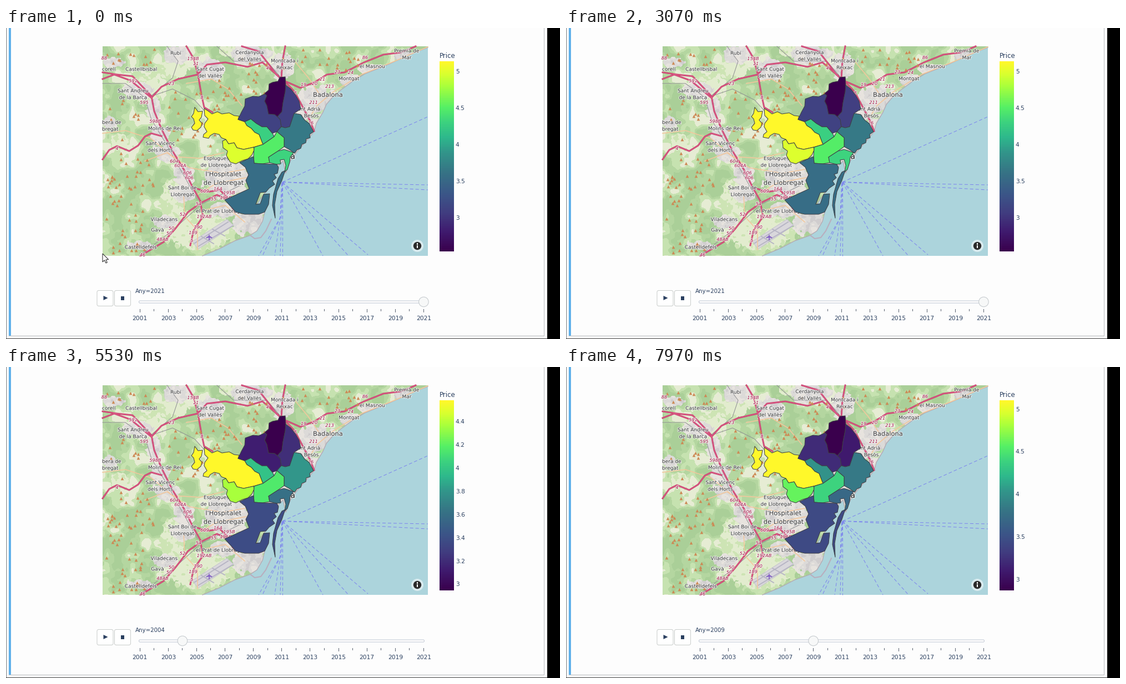
A matplotlib script for the animation above (8000 ms loop, 998x561 px).

```python
import numpy as np
import matplotlib.pyplot as plt
from matplotlib import patheffects
from matplotlib.animation import FuncAnimation
from matplotlib.colors import LinearSegmentedColormap
from matplotlib.patches import Circle, FancyBboxPatch, Polygon, Rectangle

W, H, DPI = 998, 561, 64
PT = 72 / DPI
FRAMES, STEP = 200, 40
X0, X1, Y0, Y1 = 174, 760, 33, 411
INK = "#2a3f5f"
rng = np.random.default_rng(7)

plt.rcParams["font.family"] = "DejaVu Sans"
fig = plt.figure(figsize=(W / DPI, H / DPI), dpi=DPI, facecolor="#fdfdfd")


def stage():
    ax = fig.add_axes([0, 0, 1, 1])
    ax.set(xlim=(0, W), ylim=(H, 0))
    ax.axis("off")
    return ax


ax = stage()
cmap = LinearSegmentedColormap.from_list("price", [
    (0, "#3a004d"), (.1, "#3f1a6e"), (.2, "#413d80"), (.3, "#3b5688"),
    (.42, "#367585"), (.52, "#32958a"), (.6, "#2eb88c"), (.68, "#3cd27f"),
    (.76, "#56f065"), (.87, "#a8ff3c"), (.94, "#dcff2e"), (1, "#fff82a")])


def box(x, y, w, h, color, z=1):
    ax.add_patch(Rectangle((x, y), w, h, fc=color, ec="none", zorder=z))


def text(x, y, s, size, color=INK, ha="left", **kw):
    return ax.text(x, y + .36 * size, s, fontsize=size * PT, color=color,
                   ha=ha, va="baseline", **kw)


def path(pts, color, w, z=3, **kw):
    x, y = zip(*pts)
    return ax.plot(x, y, color=color, lw=w * PT, zorder=z, clip_path=clip,
                   solid_joinstyle="round", **kw)


# ---- terrain ----
def noise(cell):
    w, h = X1 - X0, Y1 - Y0
    g = rng.random((h // cell + 2, w // cell + 2))
    y, x = np.arange(h) / cell, np.arange(w) / cell
    i, j = y.astype(int), x.astype(int)
    v, u = (y - i)[:, None], (x - j)[None, :]
    u, v = u * u * (3 - 2 * u), v * v * (3 - 2 * v)
    i, j = i[:, None], j[None, :]
    return ((g[i, j] * (1 - u) + g[i, j + 1] * u) * (1 - v)
            + (g[i + 1, j] * (1 - u) + g[i + 1, j + 1] * u) * v)


def blobs(spots):
    yy, xx = np.mgrid[Y0:Y1, X0:X1]
    return np.max([np.exp(-((xx - x) / a) ** 2 - ((yy - y) / b) ** 2)
                   for x, y, a, b in spots], axis=0)


towns = [(306, 48, 32, 18), (368, 75, 28, 24), (440, 48, 45, 20),
         (497, 70, 24, 28), (240, 112, 32, 16), (266, 145, 14, 24),
         (278, 192, 20, 22), (288, 225, 26, 18), (320, 265, 20, 24),
         (395, 268, 50, 42), (322, 298, 26, 18), (392, 328, 34, 16),
         (285, 350, 26, 14), (245, 392, 28, 10), (560, 130, 38, 30),
         (620, 96, 26, 14), (660, 74, 26, 10), (720, 52, 32, 12),
         (195, 62, 24, 10), (186, 170, 14, 14), (440, 350, 36, 26),
         (490, 190, 80, 80)]
fields = [(345, 365, 75, 42), (300, 310, 26, 45), (255, 110, 30, 30),
          (205, 205, 20, 18), (300, 75, 40, 20), (400, 40, 24, 16)]

fine = .6 * noise(9) + .4 * noise(4)
coarse = .65 * noise(26) + .35 * noise(9)
land = np.full(coarse.shape + (3,), (198, 226, 176), float)
land[coarse > .47] = (180, 214, 160)
land[coarse > .62] = (170, 207, 152)
land[coarse < .33] = (230, 236, 212)
farm = blobs(fields) + .5 * (fine - .5) > .5
land[farm] = (226, 236, 206)
land[farm & (fine > .58)] = (205, 228, 180)
urban = blobs(towns) + .55 * (fine - .5) > .48
land[urban] = (220, 218, 216)
land[urban & (fine > .6)] = (231, 227, 222)
land[urban & (fine < .34)] = (208, 205, 206)

ax.imshow(land / 255, extent=(X0, X1, Y1, Y0), aspect="auto", zorder=1)
ax.set(xlim=(0, W), ylim=(H, 0))
clip = Rectangle((X0, Y0), X1 - X0, Y1 - Y0, transform=ax.transData)

coast = [(354, 411), (385, 398), (412, 384), (440, 374), (452, 366),
         (462, 349), (466, 333), (450, 321), (470, 292), (482, 268),
         (492, 247), (499, 240), (504, 262), (512, 240), (522, 226),
         (540, 205), (555, 187), (559, 172), (571, 152), (577, 138),
         (588, 125), (603, 112), (622, 98), (646, 83), (690, 65),
         (730, 47), (760, 35)]
ax.add_patch(Polygon(coast + [(760, 411)], fc="#acd4dc", ec="none", zorder=2))
path(coast, "#b3a9b2", 1.3)
path([(440, 374), (448, 380), (459, 378), (468, 366), (478, 345)],
     "#b9adbd", 2)
ax.add_patch(Polygon([(336, 385), (398, 345), (410, 356), (346, 399)],
                     fc="#d9d7dc", ec="#c4c2cc", lw=1, zorder=2))
for a, b in [((340, 388), (400, 350)), ((346, 394), (408, 357)),
             ((352, 376), (374, 389)), ((372, 363), (394, 375))]:
    path([a, b], "#b6b4c4", 1.8)

# ---- roads and rails ----
for pts in [[(174, 100), (215, 100), (250, 125), (262, 165), (292, 215), (318, 262), (345, 310)],
            [(262, 123), (300, 110), (340, 130), (358, 150)],
            [(290, 33), (310, 60), (300, 90), (262, 122)],
            [(240, 411), (300, 365), (352, 318), (420, 285)],
            [(380, 33), (410, 60), (470, 60), (500, 95)]]:
    path(pts, "#8f8f93", 1)
for pts in [[(174, 190), (215, 185), (262, 200), (300, 232), (350, 235), (392, 225)],
            [(250, 240), (290, 225), (330, 252), (390, 262), (430, 255)],
            [(345, 300), (380, 280), (432, 270)],
            [(350, 330), (395, 320), (430, 350)],
            [(545, 165), (560, 140), (590, 115), (640, 84), (700, 60), (760, 34)],
            [(325, 100), (370, 92), (400, 110), (425, 140)],
            [(520, 60), (545, 90), (565, 120)],
            [(320, 300), (322, 340), (345, 365), (345, 400)]]:
    path(pts, "#f3c79c", 1.6)

highways = [
    [(174, 80), (200, 84), (228, 87), (245, 105), (262, 123), (267, 150),
     (280, 182), (300, 222), (322, 258), (336, 287), (350, 312)],
    [(174, 92), (195, 84), (225, 95), (262, 126), (280, 106), (310, 92),
     (345, 84), (362, 66), (395, 62), (435, 70), (462, 62), (490, 86)],
    [(325, 33), (338, 55), (346, 85), (352, 120), (357, 143), (372, 152)],
    [(425, 33), (455, 42), (473, 65), (487, 84), (496, 92)],
    [(503, 33), (498, 60), (496, 90), (520, 115), (548, 168), (555, 186)],
    [(503, 96), (530, 108), (556, 98), (578, 84), (610, 80), (645, 62),
     (680, 48), (712, 44), (738, 33)],
    [(174, 237), (186, 220), (200, 213), (222, 222), (238, 212), (250, 196),
     (262, 190), (280, 195)],
    [(242, 411), (284, 386), (305, 362), (328, 332), (350, 316), (380, 301),
     (402, 311), (420, 300)],
    [(336, 287), (362, 296), (385, 292), (398, 305), (412, 332)],
    [(350, 314), (355, 340), (338, 365), (332, 392)],
]
for road in highways:
    path(road, "#c32f62", 2.8)
    path(road, "#e0648e", 1.2, z=3.1)

for x0, x1, y0, y1, n in [(178, 250, 235, 406, 46), (178, 290, 38, 66, 12),
                          (178, 250, 130, 165, 8), (290, 350, 110, 205, 12),
                          (362, 472, 92, 146, 24), (530, 640, 38, 76, 18),
                          (395, 520, 36, 90, 10), (300, 420, 150, 215, 10),
                          (180, 270, 195, 300, 14)]:
    ax.scatter(rng.uniform(x0, x1, n), rng.uniform(y0, y1, n), s=40,
               marker="^", color="#cc8a55", lw=0, zorder=3.2)

# ---- ferry lines ----
for end in [(760, 160), (760, 283), (760, 292), (652, 409), (617, 411),
            (571, 411), (498, 411), (494, 411)]:
    path([(498, 278), end], "#7c84ee", 1, dashes=(6, 4))
for end in [(455, 411), (462, 411), (484, 411)]:
    path([(497, 280), (494, 342), end], "#7c84ee", 1, dashes=(6, 4))

# ---- map labels ----
halo = [patheffects.withStroke(linewidth=2.2, foreground=(1, 1, 1, .75))]


def label(x, y, s, size=9, color="#3a3a3a", ha="center", **kw):
    lines = s.split("|")
    for k, line in enumerate(lines):
        dy = (k - (len(lines) - 1) / 2) * 1.35 * size
        text(x, y + dy, line, size, color, ha, zorder=5, path_effects=halo,
             clip_path=clip, **kw)


for x, y, s in [
        (306, 45, "Rubí"), (439, 50, "Cerdanyola|del Vallès"),
        (502, 65, "Montcada i|Reixac"), (722, 47, "Premià de|Mar"),
        (660, 69, "el Masnou"), (618, 91, "Montgat"),
        (244, 74, "Castellbisbal"), (368, 80, "Sant Cugat|del Vallès"),
        (229, 119, "Sant Andreu|de la Barca"), (543, 152, "Sant Adrià|de Besòs"),
        (286, 181, "Molins de Rei"), (278, 214, "Sant Vicenç|dels Horts"),
        (379, 241, "Esplugues|de Llobregat"), (318, 294, "Sant Boi de|Llobregat"),
        (285, 345, "Viladecans"), (273, 364, "Gavà"), (243, 395, "Castelldefels")]:
    label(x, y, s)
label(173, 74, "corell", ha="left")
label(173, 176, "bera de|bregat", ha="left")
label(342, 330, "el Prat de Llobregat", ha="left")
label(580, 120, "Badalona", 11.5)
label(392, 271, "l'Hospitalet|de Llobregat", 11.5)
label(521, 231, "a", 14, "#222222", "right")

signs = """88 177 54;591 229 95;595 249 134;598B 269 168;23 298 100;154B 337 55
11 342 64;8 353 125;4 471 72;604 303 240;604A 314 248;606 327 261;606 330 270
609 358 294;16A 382 290;195B 402 297;196B 396 306;55 374 308;54 347 317
52 318 336;192AB 357 340;190 346 359;189 337 369;5 335 383;50 298 361
50 294 370;48AB 282 381;46 246 409;4 200 217;19 536 102;20 556 100;21 570 92
213 583 105;23 597 79;24 621 80;86 647 53;211 554 134;8 521 117;26 549 171"""
for sign in signs.replace("\n", ";").split(";"):
    s, x, y = sign.split()
    label(int(x), int(y), s, 8.2, "#a01c48", style="italic")

plane = [(0, -5.5), (1, -2), (5.5, 1), (5.5, 2.4), (1, 1.2), (.8, 4), (2.2, 5.5),
         (-2.2, 5.5), (-.8, 4), (-1, 1.2), (-5.5, 2.4), (-5.5, 1), (-1, -2)]
ax.add_patch(Polygon(np.array(plane) + (366, 377), fc="#8461c4", zorder=5))

ax.add_patch(Circle((741, 393), 11, fc=(1, 1, 1, .55), ec="none", zorder=5))
ax.add_patch(Circle((741, 393), 7.2, fc="#2b2b2b", ec="none", zorder=6))
box(740, 391.6, 2.2, 5.4, "white", 7)
box(740, 388.4, 2.2, 2.1, "white", 7)

# ---- page frame, colour bar and controls ----
box(0, 0, 1, H, "#77797c")
box(5, 0, 4, 555, "#5fb0ea")
box(5, 555, 965, 1, "#b9bcbf")
box(969, 0, 1, 556, "#b9bcbf")
box(0, 560, 975, 1, "#3c3c3c")
box(975, 0, 23, H, "black")

ax.imshow(np.linspace(1, 0, 343)[:, None], cmap=cmap, aspect="auto",
          extent=(781, 807, 403, 60), zorder=1)
ax.set(xlim=(0, W), ylim=(H, 0))
text(781, 49.5, "Price", 11.8)


def rounded(x, y, w, h, r, fc, ec):
    ax.add_patch(FancyBboxPatch((x + r, y + r), w - 2 * r, h - 2 * r, fc=fc, ec=ec,
                                lw=PT, boxstyle=f"round,pad={r}", zorder=2))


for x in (164, 195.5):
    rounded(x, 473.5, 29, 28, 3, "white", "#c9cdcb")
ax.add_patch(Polygon([(175.5, 483), (183.5, 487), (175.5, 491)], fc=INK, zorder=3))
box(207, 484, 6.5, 6.5, INK, 3)
rounded(239.5, 492, 514, 4.2, 2, "#fcfcfc", "#c3cad6")


def year_x(year):
    return 241.2 + 25.56 * (year - 2001)


for year in range(2001, 2022):
    major = year % 2
    box(year_x(year) - .5, 507, 1, 6 if major else 3.5, "#5a6270")
    if major:
        text(year_x(year), 523.5, str(year), 10.6, ha="center")

# flatten everything that stands still into one picture
fig.canvas.draw()
still = np.asarray(fig.canvas.buffer_rgba()).copy()
ax.remove()
fig.figimage(still, zorder=-1)
ax = stage()

# ---- districts ----
ZONES = "sarria corts eixample gracia marti ciutat sants andreu horta nou".split()
zones = {name: [] for name in ZONES}


def zone(name, *pts):
    zones[name].append(ax.add_patch(Polygon(
        pts, fc="w", ec="#3d3f45", lw=PT, joinstyle="round", zorder=2)))


zone("sarria", (340, 143), (346, 151), (354, 150), (352, 161), (348, 166), (353, 172),
     (351, 179), (344, 185), (337, 184), (334, 179), (340, 172), (338, 164), (334, 160),
     (338, 154))
zone("sarria", (357, 145), (366, 151), (371, 155), (381, 151), (389, 155), (402, 153),
     (411, 158), (420, 159), (418, 165), (430, 169), (434, 176), (442, 181), (448, 188),
     (456, 192), (463, 210), (446, 215), (428, 219), (416, 216), (411, 207), (401, 209),
     (396, 201), (388, 198), (384, 192), (375, 190), (368, 194), (365, 199), (355, 197),
     (356, 192), (362, 187), (357, 178), (358, 172), (364, 164), (358, 158))
zone("corts", (396, 201), (401, 209), (411, 207), (416, 216), (428, 219), (446, 215),
     (447, 220), (443, 229), (436, 236), (426, 239), (414, 245), (404, 242), (397, 230),
     (399, 222), (391, 216), (390, 204))
zone("gracia", (430, 169), (441, 164), (451, 172), (461, 178), (470, 178), (480, 190),
     (483, 196), (463, 210), (456, 192), (448, 188), (442, 181), (434, 176))
zone("horta", (431, 128), (445, 123), (455, 124), (466, 119), (470, 122), (466, 132),
     (470, 140), (473, 155), (484, 156), (489, 160), (494, 165), (496, 178), (488, 187),
     (480, 190), (470, 178), (461, 178), (451, 172), (441, 164), (430, 169), (418, 165),
     (424, 152), (430, 141))
zone("nou", (474, 101), (480, 98), (490, 96), (493, 89), (503, 88), (504, 103), (503, 115),
     (499, 135), (497, 151), (489, 160), (484, 156), (473, 155), (470, 140), (466, 132),
     (470, 122), (466, 118), (473, 112))
zone("andreu", (504, 103), (513, 110), (521, 120), (528, 132), (531, 146), (519, 154),
     (515, 167), (511, 178), (503, 180), (496, 178), (494, 165), (489, 160), (497, 151),
     (499, 135), (503, 115))
zone("marti", (519, 154), (531, 156), (538, 166), (546, 172), (554, 187), (547, 192),
     (548, 198), (541, 200), (540, 207), (533, 210), (531, 217), (524, 220), (520, 226),
     (510, 219), (501, 214), (501, 198), (488, 187), (496, 178), (503, 180), (511, 178))
zone("eixample", (488, 187), (501, 198), (501, 214), (490, 222), (473, 233), (475, 243),
     (462, 245), (447, 244), (446, 232), (447, 215), (463, 210), (483, 196))
zone("ciutat", (473, 233), (490, 222), (501, 219), (510, 222), (518, 225), (512, 233),
     (511, 242), (507, 255), (502, 260), (504, 248), (501, 237), (494, 238), (495, 245),
     (488, 246), (475, 243))
zone("sants", (446, 232), (447, 244), (462, 245), (488, 246), (491, 252), (489, 262),
     (483, 264), (487, 270), (480, 276), (484, 282), (474, 289), (468, 296), (458, 297),
     (450, 318), (458, 317), (464, 300), (475, 299), (473, 318), (466, 332), (455, 336),
     (430, 336), (414, 332), (394, 310), (412, 302), (438, 290), (432, 275), (437, 265),
     (431, 251), (421, 243), (436, 236))
zone("sants", (503, 257), (497, 275), (488, 295), (484, 318), (485, 343), (480, 320),
     (482, 300), (490, 272), (497, 260))

# year: scale minimum, scale maximum, then each district's share of the scale
PRICES = {
    2001: (1.691, 2.844, .33, 1, .7, .12, .01, .23, .1, .22, .79, .57),
    2002: (2.1, 3.4, 1, .9, .72, .62, .4, .36, .26, .18, .14, 0),
    2004: (2.945, 4.581, 1, .87, .74, .63, .52, .4, .26, .16, .11, 0),
    2007: (3.595, 5.732, 1, .84, .7, .5, .43, .46, .36, .17, .18, 0),
    2009: (2.87, 5.101, 1, .78, .68, .51, .43, .37, .25, .1, .15, 0),
    2021: (2.538, 5.136, 1, .94, .75, .67, .43, .68, .39, .21, .22, 0),
}
table = np.array(list(PRICES.values()))

ticks = [text(810, 0, "", 10.6) for _ in range(12)]
title = text(233, 474, "", 10.3)
knob = ax.add_patch(Circle((0, 494), 8.8, fc="#f7f8f8", ec="#c3c8cc", lw=PT, zorder=3))
ARROW = np.array([(0, 0), (0, 15), (3.4, 11.8), (5.9, 17), (8.3, 16), (5.9, 11),
                  (10.6, 10.6)])
HAND = np.array([(-1.5, 1), (0, 0), (1.5, 1), (1.7, 6.5), (4, 6.6), (6.2, 7.6), (8.4, 9),
                 (8.4, 13), (6.6, 18.5), (-1, 18.5), (-2.6, 14.5), (-6, 10), (-4.7, 8.4),
                 (-1.5, 11)])
cursor = ax.add_patch(Polygon(ARROW, fc="white", ec="#222222", lw=PT, zorder=9))

PLAY, HOLD, SLIDE = 3640, 500, 205


def ease(t):
    t = min(max(t, 0), 1)
    return 4 * t ** 3 if t < .5 else 1 - 4 * (1 - t) ** 3


def show_scale(lo, hi):
    step = .5 if hi - lo > 2 else .2
    values = step * np.arange(np.ceil(lo / step), np.floor(hi / step) + 1)
    for k, tick in enumerate(ticks):
        tick.set_visible(k < len(values))
        if k < len(values):
            tick.set_text(f"{values[k]:.3g}")
            tick.set_y(403 - 343 * (values[k] - lo) / (hi - lo) + 4)


def show_cursor(t):
    cursor.set_visible(t < 1640 or 3400 <= t < 4160)
    if t < 1640:
        cursor.set_xy(ARROW + (174, 407) + ease(t / 780) * np.array((9, 86)))
    else:
        cursor.set_xy(HAND + (189.7, 485))


def update(i):
    t = i * STEP
    if t < PLAY:
        year, x = 2021, year_x(2021)
    else:
        n, age = divmod(t - PLAY, HOLD)
        year = 2001 + n
        start = year_x(year - 1 if n else 2021)
        x = start + (year_x(year) - start) * ease(age / SLIDE)
    lo, hi, *shares = (np.interp(year, list(PRICES), col) for col in table.T)
    for name, share in zip(ZONES, shares):
        for patch in zones[name]:
            patch.set_facecolor(cmap(share))
    show_scale(lo, hi)
    title.set_text(f"Any={year}")
    knob.center = x, 494
    show_cursor(t)
    return []


anim = FuncAnimation(fig, update, frames=FRAMES, interval=STEP, repeat=True,
                     repeat_delay=0, init_func=lambda: update(0), blit=False)
plt.show()
```
